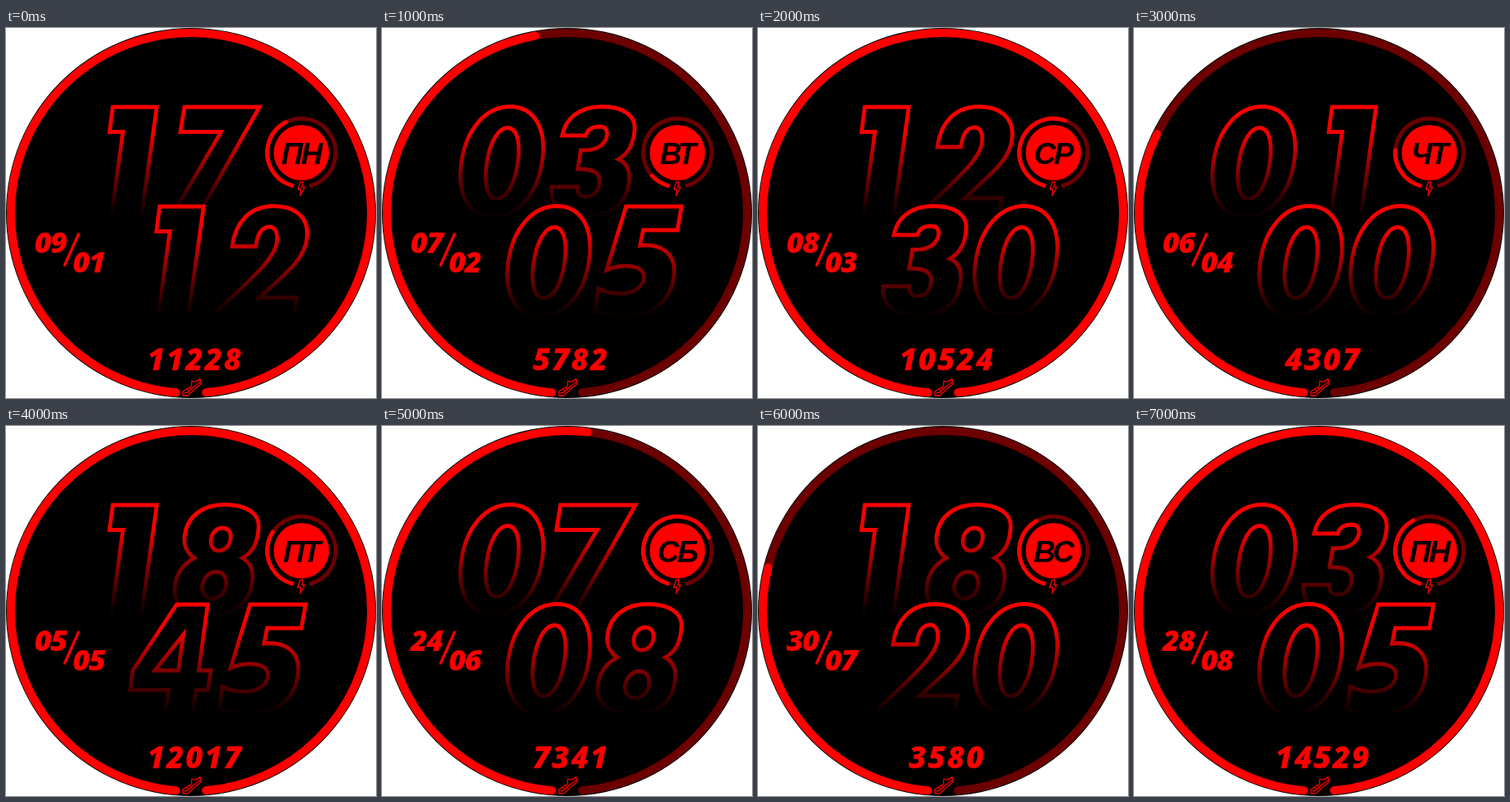
Write an HTML page with a canvas that moves like this. It is 454 by 454 pixels and loops after 8 s.

```html
<!DOCTYPE html>
<html lang="ru">
<head>
<meta charset="utf-8">
<style>
  html, body { margin: 0; width: 100%; height: 100%; overflow: hidden; background: #fff; }
  canvas { display: block; }
</style>
</head>
<body>
<canvas id="face" width="454" height="454"></canvas>
<script>
const ctx = document.getElementById('face').getContext('2d');
const RED = '#f00', DIM = '#6c0000';
const STEP_MS = 1000;

// Arc ends are degrees clockwise from the bottom of each gauge.
const screens = [
  { time: '1712', date: ['09', '01'], day: 'ПН', steps: '11228', ring: 355.5, battery: 153 },
  { time: '0305', date: ['07', '02'], day: 'ВТ', steps: '5782', ring: 169.8, battery: 48 },
  { time: '1230', date: ['08', '03'], day: 'СР', steps: '10524', ring: 355.5, battery: 200 },
  { time: '0100', date: ['06', '04'], day: 'ЧТ', steps: '4307', ring: 116, battery: 94 },
  { time: '1845', date: ['05', '05'], day: 'ПТ', steps: '12017', ring: 355.5, battery: 123 },
  { time: '0708', date: ['24', '06'], day: 'СБ', steps: '7341', ring: 186.6, battery: 247 },
  { time: '1820', date: ['30', '07'], day: 'ВС', steps: '3580', ring: 104, battery: 150 },
  { time: '0305', date: ['28', '08'], day: 'ПН', steps: '14529', ring: 355.5, battery: 152 }
];

// Closed oval leaning to the right; k sets how square its shoulders are.
function oval(cx, cy, rx, ry, k = 0.58) {
  const at = (x, y) => `${cx + x * rx - 0.15 * y * ry} ${cy + y * ry}`;
  return `M${at(0, -1)}C${at(k, -1)} ${at(1, -k)} ${at(1, 0)}` +
    `C${at(1, k)} ${at(k, 1)} ${at(0, 1)}` +
    `C${at(-k, 1)} ${at(-1, k)} ${at(-1, 0)}` +
    `C${at(-1, -k)} ${at(-k, -1)} ${at(0, -1)}Z`;
}

const digits = Object.fromEntries(Object.entries({
  0: oval(53, 70, 49.5, 67.5, 0.6) + oval(53.5, 72, 19, 43.5, 0.6),
  1: 'M37 3H91L72 139H35L49.5 33.5H33Z',
  2: 'M14 52C18 22 36 2.5 65 2.5C91 2.5 108 16 106 40C104 66 84 82 47 115H93L89 139H-5L-3 130C46 84 68 64 69 45C70 34 66 28 60 28C51 28 45 36 43 52Z',
  3: 'M15 38C19 17 36 2.5 64 2.5C91 2.5 105 14 104 30C103 47 97 60 84 67C95 72 99 82 97 96C93 124 73 137 44 137C16 137 0 125 2 101H34C33 109 37 113 44 113C54 113 60 106 61 95C62 84 54 79 34 79L38 56C58 57 68 49 70 38C71 30 67 27 61 27C52 27 46 31 44 38Z',
  4: 'M58 3H96L85 84H100L96 108H82L77 139H43L48 108H1L4 84ZM66 40L31 84H60Z',
  5: 'M36 3H104L99 32H57L53 51C78 48 97 60 95 86C92 118 70 137 36 137C20 137 8 135-2 131L2 104C10 108 18 110 28 110C46 110 57 102 58 90C58 80 48 76 36 76C27 76 19 78 12 81Z',
  7: 'M13 3H105L28 139H-4L58 33.5H8Z',
  8: 'M62 2.5C90 2.5 105 14 104 30C103 48 98 60 84 68C94 74 98 84 96 96C93 124 74 137 45 137C17 137 0 126 1 106C2 86 12 75 25 68C16 62 12 52 13 42C16 16 36 2.5 62 2.5Z' +
    oval(57.5, 45, 12, 14) + oval(49.5, 101.5, 14.5, 16.5)
}).map(([key, d]) => [key, new Path2D(d)]));

const shoe = new Path2D('M217 446L227 440C229 437 227 435 228 433C232 435 236 433 238 430.5L240 436L234 441L223 451H217ZM219 448L223 447L232 439L239 434M221 443L224 445M224 441L227 443');
const bolt = new Path2D('M361 189L358 198H361.5L361 205.5L366.5 195.5H363L364.5 189Z');

const fade = ctx.createLinearGradient(0, 0, 0, 139);
[[0, 1], [0.25, 0.95], [0.6, 0.5], [0.85, 0.17], [1, 0]]
  .forEach(([at, alpha]) => fade.addColorStop(at, `rgba(255,0,0,${alpha})`));

function bigDigit(char, x, y) {
  ctx.save();
  ctx.translate(x, y);
  ctx.lineJoin = 'miter';
  ctx.strokeStyle = fade;
  ctx.lineWidth = 4.8;
  ctx.stroke(digits[char]);
  ctx.restore();
}

function arc(cx, cy, r, width, from, to, color) {
  const rad = deg => (deg + 90) * Math.PI / 180;
  ctx.beginPath();
  ctx.arc(cx, cy, r, rad(from), rad(to));
  ctx.lineWidth = width;
  ctx.strokeStyle = color;
  ctx.stroke();
}

function disc(cx, cy, r, color) {
  ctx.beginPath();
  ctx.arc(cx, cy, r, 0, 2 * Math.PI);
  ctx.fillStyle = color;
  ctx.fill();
}

function label(text, x, y, font, color, align = 'left', spacing = 0) {
  ctx.font = font;
  ctx.fillStyle = color;
  ctx.textAlign = align;
  ctx.letterSpacing = spacing + 'px';
  ctx.fillText(text, x, y);
}

function draw(s) {
  ctx.fillStyle = '#fff';
  ctx.fillRect(0, 0, 454, 454);
  disc(227, 227, 227, '#000');
  ctx.lineCap = 'round';
  ctx.lineJoin = 'round';

  arc(227, 227, 221, 10, 4.8, 355.2, DIM);
  arc(227, 227, 221, 10, 4.8, Math.min(s.ring, 355.2), RED);

  [...s.time].forEach((char, i) => {
    const row = i >> 1;
    bigDigit(char, 94 + 112 * (i % 2) + 57.5 * row, 94 + 122 * row);
  });

  arc(362.5, 153, 42, 5, 16, 344, DIM);
  arc(362.5, 153, 42, 5, 16, s.battery, RED);
  disc(362.5, 153, 34, RED);
  label(s.day, 362, 167, 'italic bold 37px "Liberation Sans", sans-serif', '#000', 'center', -2.5);

  const dateFont = 'italic 800 36px "Open Sans", sans-serif';
  label(s.date[0], 35, 276, dateFont, RED, 'left', -1.5);
  label(s.date[1], 82, 300, dateFont, RED, 'left', -1.5);
  ctx.strokeStyle = RED;
  ctx.lineWidth = 3.4;
  ctx.beginPath();
  ctx.moveTo(72, 291);
  ctx.lineTo(89, 253);
  ctx.stroke();

  label(s.steps, 232, 420, 'italic 800 37px "Open Sans", sans-serif', RED, 'center', 2);

  ctx.lineWidth = 1.3;
  ctx.stroke(shoe);
  ctx.stroke(bolt);
}

function tick() {
  draw(screens[Math.floor(performance.now() / STEP_MS) % screens.length]);
  requestAnimationFrame(tick);
}
tick();
</script>
</body>
</html>
```
